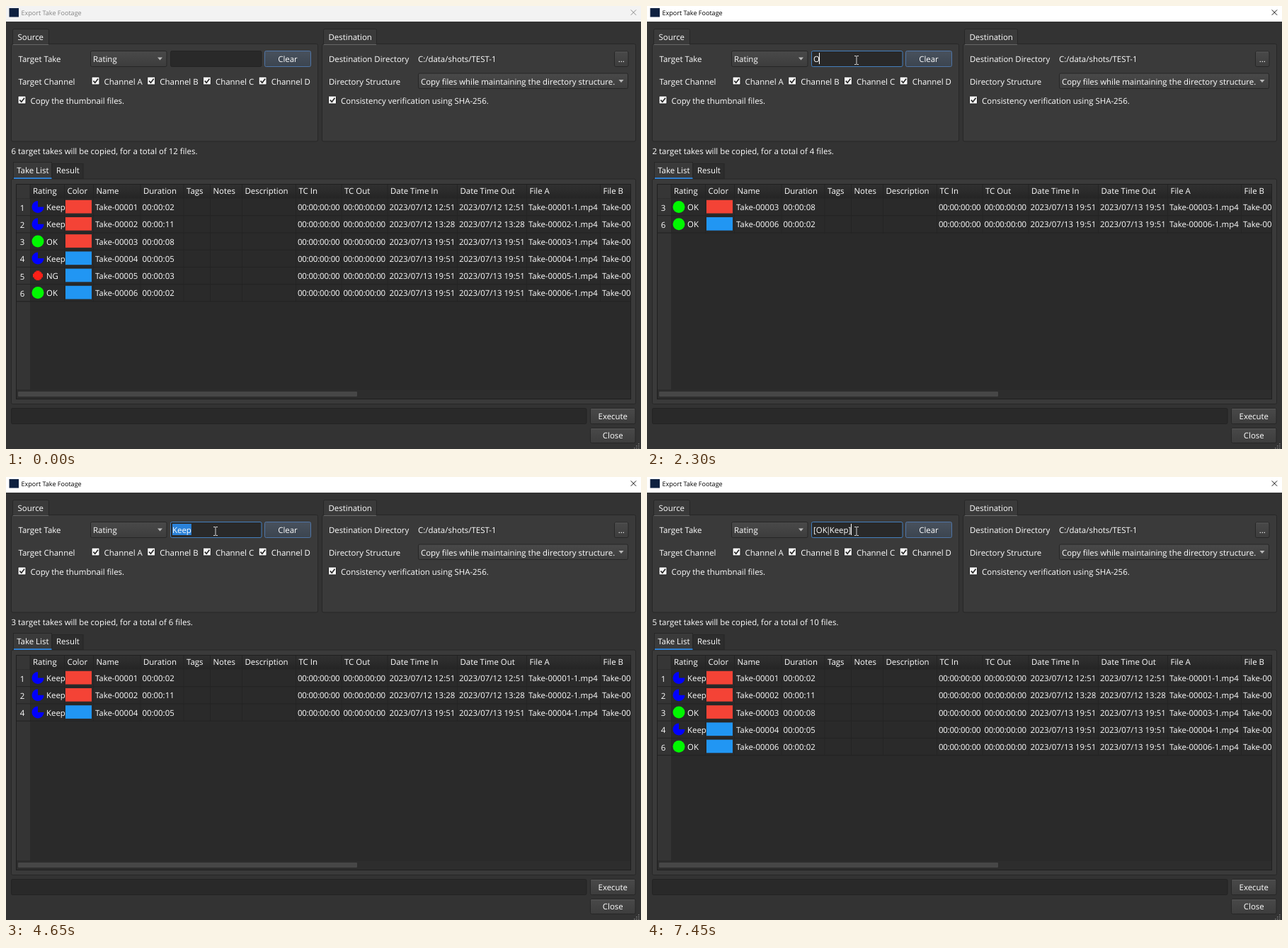
Animation of 897 by 625 pixels, one loop 8 s. Source, as an HTML page:

```html
<!DOCTYPE html>
<html lang="en">
<head>
<meta charset="utf-8">
<title>Export Take Footage</title>
<style>
  html, body { margin: 0; width: 100%; height: 100%; overflow: hidden; background: #333; }
  svg { display: block; width: 897px; height: 625px; }
  text {
    font: 11.45px "Open Sans", "Noto Sans", sans-serif;
    fill: #fff;
    text-rendering: geometricPrecision;
    white-space: pre;
  }
  .mid { text-anchor: middle; }
  .tc { letter-spacing: -.18px; }
  #caption { font-size: 9.05px; }
  .off { fill: #7d7d7d; }
</style>
</head>
<body>
<svg id="stage" viewBox="0 0 897 625">
  <defs>
    <linearGradient id="btn" x2="0" y2="1">
      <stop stop-color="#494949"/><stop offset="1" stop-color="#3d3d3d"/>
    </linearGradient>
    <linearGradient id="blueBtn" x2="0" y2="1">
      <stop stop-color="#48515d"/><stop offset="1" stop-color="#3c4550"/>
    </linearGradient>
    <linearGradient id="head" x2="0" y2="1">
      <stop stop-color="#303030"/><stop offset="1" stop-color="#252525"/>
    </linearGradient>
    <clipPath id="tableClip"><rect x="15" y="252" width="867" height="302"/></clipPath>
  </defs>
  <g id="base"></g>
  <g id="table" clip-path="url(#tableClip)"></g>
  <g id="notes"></g>
  <g id="field"></g>
  <path id="arrow" d="M.5.5V15L4 11.8 6.3 17 8.6 16 6.4 11H11Z" fill="#fff" stroke="#000" stroke-width=".9"/>
  <path id="beam" d="M-3 -6H-.7L0 -5.3.7 -6H3M0 -5.3V5.3M-3 6H-.7L0 5.3.7 6H3" fill="none" stroke="#d8d8d8"/>
</svg>
<script>
const LOOP = 8000;
const $ = id => document.getElementById(id);

const rect = (x, y, w, h, fill, stroke = 'none', r = 0) =>
  `<rect x="${x}" y="${y}" width="${w}" height="${h}" rx="${r}" fill="${fill}" stroke="${stroke}"/>`;
const text = (x, y, s, cls = '') => `<text x="${x}" y="${y}" class="${cls}">${s}</text>`;
const path = (d, stroke, w = 1) => `<path d="${d}" fill="none" stroke="${stroke}" stroke-width="${w}"/>`;

const button = (x, y, w, h, label, cls = '') =>
  rect(x, y, w, h, cls ? '#3b3b3b' : 'url(#btn)', '#262626', 2) +
  (cls ? '' : path(`M${x + 1} ${y + 1}H${x + w - 1}`, '#575757')) +
  text(x + w / 2, y + h / 2 + 4.3, label, 'mid ' + cls);

const combo = (x, y, w, h, label) =>
  rect(x, y, w, h, 'url(#btn)', '#262626', 2) + text(x + 3.5, y + 15.5, label) +
  `<path d="M${x + w - 13} ${y + 9}h7l-3.5 4z" fill="#b9b9b9"/>`;

const check = (x, y, label) =>
  rect(x, y, 11, 11, '#f4f4f4', '#1f1f1f', 1) +
  path(`M${x + 2.4} ${y + 5.6}l2.4 2.6 4.2 -5.4`, '#222', 1.6) +
  text(x + 17.6, y + 11, label);

const group = (x, w, tabX, tabW, label) =>
  rect(x, 53.5, w, 137.5, '#3a3a3a', '#272727', 2) +
  rect(tabX, 32.5, tabW, 22, '#3a3a3a', '#272727', 2) +
  path(`M${tabX + .5} 54.5H${tabX + tabW - .5}`, '#666') +
  text(tabX + 7, 47.7, label);

function drawBase() {
  const grip = [[894, 618], [891, 621], [894, 621], [888, 624], [891, 624], [894, 624]]
    .map(([x, y]) => rect(x - 1, y - 1, 1.5, 1.5, '#777')).join('');
  $('base').innerHTML =
    rect(0, 0, 897, 625, '#333') +
    `<rect id="bar" width="897" height="22"/>` +
    rect(4.5, 3, 13.5, 12.5, '#0e2140') +
    `<text id="caption" x="21.5" y="13">Export Take Footage</text>` +
    `<path id="cross" d="M882.7 5.4l7.4 7.4m0-7.4l-7.4 7.4" fill="none"/>` +
    group(7.5, 433, 9.5, 51, 'Source') +
    text(17.5, 79, 'Target Take') + combo(119.5, 63.5, 107.5, 22, 'Rating') +
    rect(365.5, 63.5, 65, 22, 'url(#blueBtn)', '#4f75a6', 2) + text(398, 79, 'Clear', 'mid') +
    text(17.5, 111, 'Target Channel') +
    [...'ABCD'].map((c, i) => check(121 + i * 78.7, 100, 'Channel ' + c)).join('') +
    check(17, 127, 'Copy the thumbnail files.') +
    group(446.5, 443, 448.5, 75, 'Destination') +
    text(456, 79, 'Destination Directory') + text(582, 79, 'C:/data/shots/TEST-1') +
    button(859.5, 64, 19.5, 21.5, '...') +
    text(456, 110.5, 'Directory Structure') +
    combo(582.5, 95, 296, 21.5, 'Copy files while maintaining the directory structure.') +
    check(455.5, 127, 'Consistency verification using SHA-256.') +
    rect(7.5, 244, 882, 317.5, '#3a3a3a', '#272727', 2) +
    rect(65, 222.5, 44, 21, '#2d2d2d', '#272727') + text(71, 236, 'Result') +
    rect(10.5, 220.5, 54, 23, '#3a3a3a', '#272727') + text(15.2, 236, 'Take List') +
    rect(11, 242, 53.5, 2, '#2f7fd0') +
    rect(14.5, 251.5, 868, 303, '#2a2a2a', '#1f1f1f') +
    rect(7.5, 567.5, 812.5, 22, '#292929', '#232323', 2) +
    button(825.5, 595.5, 63.5, 21, 'Close') + grip;
}

const columns = [
  ['Rating', 34], ['Color', 82.5], ['Name', 123.5], ['Duration', 190], ['Tags', 251],
  ['Notes', 288.5], ['Description', 333.5], ['TC In', 409.5], ['TC Out', 474],
  ['Date Time In', 539], ['Date Time Out', 637.5], ['File A', 735.5], ['File B', 839.5]
];

const RED = '#f44336', BLUE = '#2196f3', LATE = '2023/07/13 19:51';
const takes = [
  ['Keep', RED, '02', '2023/07/12 12:51'],
  ['Keep', RED, '11', '2023/07/12 13:28'],
  ['OK', RED, '08', LATE],
  ['Keep', BLUE, '05', LATE],
  ['NG', BLUE, '03', LATE],
  ['OK', BLUE, '02', LATE]
].map(([rating, color, secs, date], i) => ({ id: i + 1, rating, color, secs, date }));

const icons = {
  OK: '<circle r="8.5" fill="#00f800"/>',
  Keep: '<path d="M0 0V-8.5A8.5 8.5 0 1 0 8.5 0Z" fill="#00f"/>',
  NG: path('M-7 0H7M0 -6.8V6.8', '#fb2018', 5) + path('M-4.6 -4.6L4.6 4.6M4.6 -4.6L-4.6 4.6', '#fb2018', 3.6)
};

// The filter is a case-insensitive pattern; an unfinished one matches nothing.
function filter(query) {
  try {
    const re = new RegExp(query, 'i');
    return takes.filter(t => re.test(t.rating));
  } catch {
    return [];
  }
}

function row(t, i) {
  const y = 272 + i * 24.2, base = y + 16.2;
  const name = 'Take-0000' + t.id, zero = '00:00:00:00';
  const cells = [[2, name], [3, '00:00:' + t.secs], [7, zero], [8, zero], [9, t.date], [10, t.date],
    [11, name + '-1.mp4'], [12, name + '-2.mp4']];
  return rect(15, y, 19, 23.7, '#343434') + text(23, base + .5, t.id, 'mid') +
    path(`M15 ${y + 23.8}H882`, '#232323') +
    `<g transform="translate(45 ${y + 11.5})">${icons[t.rating]}</g>` +
    text(57, base, t.rating) + rect(84, y + 1.8, 37, 18.7, t.color) +
    cells.map(([c, s]) => text(columns[c][1] + 2.4, base, s, s === zero ? 'tc' : '')).join('');
}

function drawTable(query) {
  const rows = filter(query), n = rows.length;
  const shift = n ? 0 : -18.6, bottom = 272 + n * 24.2;
  $('table').innerHTML =
    rect(15, 252, 867, 19.5, 'url(#head)') +
    (n ? rect(15, 252, 19, 19.5, '#363636') + rect(15, bottom, 19, 541 - bottom, '#343434') : '') +
    columns.map(([label, x]) =>
      path(`M${x + shift} 252V${bottom}`, '#242424') + text(x + 4 + shift, 265, label)).join('') +
    rows.map(row).join('') +
    rect(15, 541.5, 867, 13, '#2d2d2d') +
    rect(17, 544, n ? 479 : 489, 7, '#474747', 'none', 1);
  $('notes').innerHTML =
    text(7.5, 209, `${n} target takes will be copied, for a total of ${n * 2} files.`) +
    button(825.5, 567.5, 63.5, 22, 'Execute', n ? '' : 'off') +
    (n ? '' : `<text x="16" y="159" style="fill:#d4060c">At least one more take is required for execution.</text>`);
}

function drawField({ query, focus, caret, selected }) {
  $('field').innerHTML =
    rect(232.5, 63.5, 128.5, 22, '#292929', focus ? '#447fbd' : '#232323', 2) +
    '<rect id="mark" x="235" y="66" height="16" width="0" fill="#2a82da"/>' +
    text(235, 79, query) + '<path id="caret" stroke="#fff"/>';
  const label = $('field').querySelector('text');
  const bar = query.indexOf('|');
  if (bar >= 0) {
    // tighten the wide vertical bar
    label.setAttribute('dx', [...query].map((c, i) => i === bar || i === bar + 1 ? -1.7 : 0).join(' '));
  }
  const end = query ? label.getEndPositionOfChar(query.length - 1).x : 235;
  if (selected) $('mark').setAttribute('width', end - 235);
  if (caret) $('caret').setAttribute('d', `M${Math.floor(end) + .5} 66V82`);
}

// time, text in the field, selected
const typing = [
  [0, ''], [2300, 'O'], [2370, 'OK'], [2970, 'OK', true],
  [3520, 'K'], [3720, 'Ke'], [3850, 'Kee'], [4050, 'Keep'], [4650, 'Keep', true],
  [5250, '['], [5710, '[O'], [5780, '[OK'], [6190, '[OK|'], [6570, '[OK|K'],
  [6790, '[OK|Ke'], [6920, '[OK|Kee'], [7050, '[OK|Keep'], [7450, '[OK|Keep]']
];

function stateAt(t) {
  const [, query, selected = false] = typing.filter(k => k[0] <= t).pop();
  return { query, selected, focus: t >= 1240, caret: t >= 1240 && !selected && !(t >= 1770 && t < 2300) };
}

function movePointer(t) {
  const step = Math.min(10, Math.floor((t - 410) / 76));
  const left = (1 - Math.max(0, step) / 10) ** 2;
  const x = 296 + 34 * left, y = 76.5 + 474 * left;
  const inField = y < 86;
  const place = (id, on) => {
    $(id).setAttribute('transform', `translate(${x} ${y})`);
    $(id).setAttribute('visibility', on ? 'visible' : 'hidden');
  };
  place('arrow', t >= 410 && !inField);
  place('beam', t >= 410 && inField);
}

function paintTitle(active) {
  $('bar').setAttribute('fill', active ? '#fff' : '#f3f3f3');
  $('caption').style.fill = active ? '#000' : '#858585';
  $('cross').setAttribute('stroke', active ? '#111' : '#8c8c8c');
}

let lastField, lastQuery;
function frame(now) {
  const t = now % LOOP, state = stateAt(t), key = JSON.stringify(state);
  if (state.query !== lastQuery) drawTable(lastQuery = state.query);
  if (key !== lastField) { drawField(state); lastField = key; }
  paintTitle(t >= 1170);
  movePointer(t);
}

drawBase();
const start = performance.now();
frame(0);
requestAnimationFrame(function tick(now) {
  frame(Math.max(0, now - start));
  requestAnimationFrame(tick);
});
</script>
</body>
</html>
```
